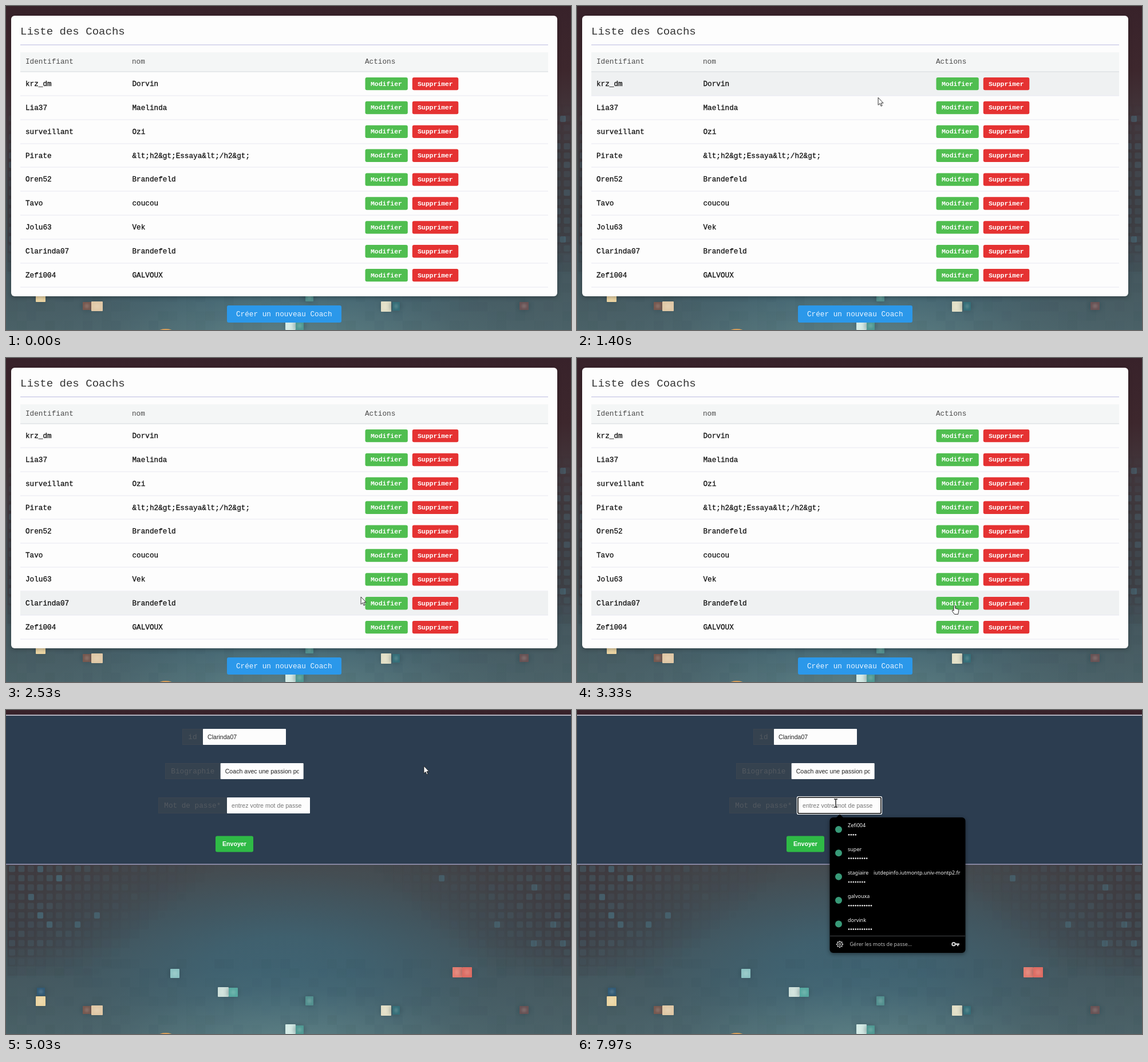
An HTML page with a canvas for the animation above (8 s loop, 987 by 567 pixels).

```html
<!DOCTYPE html>
<html lang="fr">
<head>
<meta charset="utf-8">
<title>Liste des Coachs</title>
<style>
html, body { margin: 0; width: 100%; height: 100%; overflow: hidden; background: #3a2329; }
canvas { display: block; }
</style>
</head>
<body>
<canvas id="stage" width="987" height="567"></canvas>
<script>
const W = 987, H = 567, LOOP = 8000;
const PAGE_SWITCH = 4000, FOCUS = 7895;
const MONO = '"Liberation Mono", "Courier New", monospace';
const SANS = '"Liberation Sans", Arial, sans-serif';
const UI = '"Noto Sans", "Open Sans", sans-serif';
const ctx = document.getElementById('stage').getContext('2d');

const coaches = [
  ['krz_dm', 'Dorvin'], ['Lia37', 'Maelinda'], ['surveillant', 'Ozi'],
  ['Pirate', '&lt;h2&gt;Essaya&lt;/h2&gt;'], ['Oren52', 'Brandefeld'],
  ['Tavo', 'coucou'], ['Jolu63', 'Vek'], ['Clarinda07', 'Brandefeld'],
  ['Zefi004', 'GALVOUX']
];
const logins = [
  ['Zefi004', 4], ['super', 9], ['stagiaire', 8, 'iutdepinfo.iutmontp.univ-montp2.fr'],
  ['galvouxa', 11], ['dorvink', 11]
];
const ROW_TOP = 115, ROW_H = 41.87;

// Pointer path: time, x, y
const path = [
  [600, 440, -30], [1400, 526, 160], [2100, 602, 385], [2530, 620, 418],
  [3400, 660, 433], [4130, 660, 433], [5030, 730, 98], [6230, 400, 228],
  [6600, 400, 228], [7370, 452, 163]
];

function rect(c, x, y, w, h, fill, r = 0) {
  c.fillStyle = fill;
  c.beginPath();
  c.roundRect(x, y, w, h, r);
  c.fill();
}

function text(str, x, y, size, color, family = MONO, weight = 400) {
  ctx.font = `${weight} ${size}px ${family}`;
  ctx.fillStyle = color;
  ctx.fillText(str, x, y);
}

function hash(i, j) {
  const v = Math.sin(i * 127.1 + j * 311.7) * 43758.5453;
  return v - Math.floor(v);
}

// Soft elliptical light; rgb is "r,g,b"
function glow(c, x, y, rx, ry, rgb, alpha) {
  c.save();
  c.translate(x, y);
  c.scale(rx / ry, 1);
  const g = c.createRadialGradient(0, 0, 0, 0, 0, ry);
  [[0, 1], [0.25, 0.88], [0.5, 0.5], [0.75, 0.13], [1, 0]]
    .forEach(([s, a]) => g.addColorStop(s, `rgba(${rgb},${alpha * a})`));
  c.fillStyle = g;
  c.fillRect(-ry, -ry, ry * 2, ry * 2);
  c.restore();
}

function makeBackdrop() {
  const cv = document.createElement('canvas');
  cv.width = W;
  cv.height = H;
  const c = cv.getContext('2d');
  const g = c.createLinearGradient(0, 0, 0, H);
  [[0, '#38222a'], [0.2, '#3d272d'], [0.36, '#43383d'], [0.5, '#454a4e'],
   [0.65, '#434e54'], [0.8, '#44565d'], [1, '#4b6268']].forEach(s => g.addColorStop(...s));
  c.fillStyle = g;
  c.fillRect(0, 0, W, H);
  glow(c, 485, 455, 500, 230, '62,102,119', 0.8);
  glow(c, 490, 600, 420, 150, '112,152,152', 0.5);

  // small tiles fading in from both edges
  for (let j = 0; j < 18; j++) {
    for (let i = 0; i < 60; i++) {
      const x = 5 + i * 16.43, y = 175 + j * 16.25;
      const reach = 360 - Math.max(0, j - 6) * 18;
      const k = 1 - Math.min(x, W - x) / reach;
      if (k <= 0) continue;
      const fade = Math.min(1, (18 - j) / 4, (j + 1) / 6);
      const a = k * fade, n = hash(i, j);
      rect(c, x - 2.5, y - 2.5, 16.43, 16.25, `rgba(56,42,47,${a * 0.5})`);
      rect(c, x, y, 11, 11, `rgba(72,98,110,${a * (0.25 + 0.35 * n * n)})`, 2);
    }
  }
  [[76, 375], [125, 375], [159, 359], [60, 359], [93, 294], [60, 278], [44, 327],
   [858, 375], [956, 375], [923, 310], [922, 408], [973, 408], [761, 294], [973, 197]]
    .forEach(([x, y]) => rect(c, x - 5, y - 5, 10, 11, 'rgba(80,128,146,.38)', 2));

  // faint blocks lower down
  for (let j = 0; j < 8; j++) {
    for (let i = 0; i < 60; i++) {
      const n = hash(i + 90, j + 40);
      if (n > 0.55) rect(c, i * 16.43 + 3, 436 + j * 16.4, 16.4, 16.4, `rgba(36,58,66,${(n - 0.5) * 0.12})`);
    }
  }

  [[54, 486, 14, 14, '#315a76'], [52, 501, 17, 17, '#ecd5a2'],
   [134, 518, 15, 14, '#77584f'], [149, 517, 20, 17, '#e0c8a6'],
   [287, 453, 16, 16, '#8cc3c3'], [370, 485, 19, 17, '#cfe1db'],
   [389, 486, 16, 16, '#57a8a0'], [523, 501, 14, 16, '#528f8e'],
   [655, 517, 18, 18, '#e2dfc6'], [675, 518, 13, 15, '#356e78'],
   [780, 450, 17, 18, '#e27c70'], [797, 450, 17, 18, '#dd6c63'],
   [897, 518, 16, 14, '#685254'], [488, 550, 18, 17, '#d4ebe6'],
   [506, 552, 14, 15, '#4f9892']].forEach(([x, y, w, h, col]) => {
    glow(c, x + w / 2, y + h / 2, 19, 17, '40,66,76', 0.4);
    rect(c, x, y, w, h, col, 1);
    glow(c, x + w / 2, y + h / 2, w / 2, h / 2, '255,255,245', 0.14);
  });
  c.fillStyle = '#dba05a';
  c.beginPath();
  c.ellipse(279, 570, 13, 5, 0, 0, 7);
  c.fill();
  return cv;
}
const backdrop = makeBackdrop();

// Monotone cubic through the path points
function slope(i, axis) {
  const a = path[i - 1], b = path[i], d = path[i + 1];
  if (!a || !d || (b[axis] - a[axis]) * (d[axis] - b[axis]) <= 0) return 0;
  return (d[axis] - a[axis]) / (d[0] - a[0]);
}
function pointer(t) {
  const last = path.length - 1;
  if (t <= path[0][0]) return path[0].slice(1);
  if (t >= path[last][0]) return path[last].slice(1);
  const i = path.findIndex(p => p[0] > t) - 1;
  const p = path[i], q = path[i + 1], span = q[0] - p[0], u = (t - p[0]) / span;
  const s = u * u * (3 - 2 * u);
  return [1, 2].map(k => p[k] + (q[k] - p[k]) * s
    + span * (slope(i, k) * u * (1 - u) ** 2 - slope(i + 1, k) * u * u * (1 - u)));
}

const inside = ([px, py], x, y, w, h) => px >= x && px <= x + w && py >= y && py <= y + h;

const shapes = {
  arrow: new Path2D('M0 0V13L3 10.3L5 15L7 14.1L5 9.6H9Z'),
  hand: new Path2D('M-1.4 1Q0-1 1.3 1V5.2L6 6.6Q7.6 7 7.3 9.5L6.2 15.5H0L-4 10.3Q-4.4 8 -2.5 8.5L-1.4 9.5Z'),
  beam: new Path2D('M-3-7H-1Q0-7 0-6Q0-7 1-7H3M0-6V6M-3 7H-1Q0 7 0 6Q0 7 1 7H3')
};
function drawCursor([x, y], kind) {
  ctx.save();
  ctx.translate(x, y);
  ctx.lineJoin = 'round';
  ctx.strokeStyle = '#1c1c1c';
  ctx.lineWidth = kind === 'beam' ? 1.4 : 0.9;
  if (kind !== 'beam') {
    ctx.fillStyle = '#fff';
    ctx.fill(shapes[kind]);
  }
  ctx.stroke(shapes[kind]);
  ctx.restore();
}

function listPage(t) {
  ctx.shadowColor = 'rgba(0,0,0,.3)';
  ctx.shadowBlur = 7;
  ctx.shadowOffsetY = 2;
  rect(ctx, 9, 17, 954, 491, '#fdfdfd', 6);
  ctx.shadowColor = 'transparent';
  text('Liste des Coachs', 25, 50, 19.05, '#333');
  rect(ctx, 25, 67, 922, 2, '#dadaee');
  rect(ctx, 25, 81, 922, 34, '#f4f6f6');
  [['Identifiant', 34], ['nom', 220], ['Actions', 627]]
    .forEach(([s, x]) => text(s, x, 101, 12.7, '#4a4a4a'));

  const [, hoverY] = pointer(t - 40);
  const hover = Math.floor((hoverY - ROW_TOP) / ROW_H);
  coaches.forEach((coach, i) => {
    const top = ROW_TOP + i * ROW_H, mid = top + 21;
    if (i === hover) rect(ctx, 25, top, 922, ROW_H, '#eff1f2');
    rect(ctx, 25, Math.round(top + ROW_H) - 0.5, 922, 1, '#e8e8f2');
    ctx.strokeStyle = '#111';
    ctx.lineWidth = 0.3;
    coach.forEach((s, k) => {
      const x = k ? 220.5 : 34;
      text(s, x, mid + 4, 12.7, '#111');
      ctx.strokeText(s, x, mid + 4);
    });
    rect(ctx, 627.5, mid - 11, 74.3, 22.3, '#50be50', 3);
    rect(ctx, 709.8, mid - 11, 80.5, 22.3, '#e53232', 3);
    text('Modifier', 637, mid + 3.6, 11.43, '#fff', MONO, 700);
    text('Supprimer', 719, mid + 3.6, 11.43, '#fff', MONO, 700);
  });
  rect(ctx, 25, 114.5, 922, 1, '#d5dade');

  rect(ctx, 386, 524, 200, 30, '#2b98ea', 3);
  text('Créer un nouveau Coach', 402, 543, 12.7, '#eaf5ff');
}

function field(label, x, fx, y, value, color) {
  rect(ctx, x, y, fx - x, 28, '#35424f', 2);
  ctx.strokeStyle = '#3e4750';
  ctx.lineWidth = 0.8;
  ctx.strokeRect(x + 0.4, y + 0.4, fx - x, 27.2);
  text(label, x + 10.3, y + 18, 12.7, '#535960');
  rect(ctx, fx, y, 145, 28, '#fdfdfd', 1);
  ctx.save();
  ctx.beginPath();
  ctx.rect(fx + 8, y, 129, 28);
  ctx.clip();
  text(value, fx + 8, y + 17.6, 10.6, color, SANS);
  ctx.restore();
}

function formPage() {
  rect(ctx, 0, 8, W, 263, '#2c3d50');
  rect(ctx, 0, 8.3, W, 1.6, '#c3bfca');
  rect(ctx, 0, 269.2, W, 1.6, '#a59fbd');
  field('id', 308, 344, 33, 'Clarinda07', '#222');
  field('Biographie', 278, 374.7, 93, 'Coach avec une passion pour', '#222');
  field('Mot de passe*', 266, 386, 153, 'entrez votre mot de passe', '#777');
  rect(ctx, 366, 220.5, 66, 28, '#2fba46', 3);
  text('Envoyer', 378, 238, 10.6, '#fff', SANS, 700);
}

function focusRing() {
  [[384.7, 151.7, 147.6, 30.6, '#fff', 1.6], [386, 153, 145, 28, '#101010', 1.6]]
    .forEach(([x, y, w, h, color, line]) => {
      ctx.strokeStyle = color;
      ctx.lineWidth = line;
      ctx.beginPath();
      ctx.roundRect(x, y, w, h, 2);
      ctx.stroke();
    });
}

function dot(x, y, r, color) {
  ctx.fillStyle = color;
  ctx.beginPath();
  ctx.arc(x, y, r, 0, 7);
  ctx.fill();
}

function ring(x, y, r, line) {
  ctx.lineWidth = line;
  ctx.beginPath();
  ctx.arc(x, y, r, 0, 7);
  ctx.stroke();
}

function popup(alpha) {
  ctx.save();
  ctx.globalAlpha = alpha;
  ctx.shadowColor = 'rgba(0,0,0,.45)';
  ctx.shadowBlur = 7;
  ctx.shadowOffsetY = 2;
  rect(ctx, 441.5, 188, 237, 237, '#000', 6);
  ctx.shadowColor = 'transparent';
  ctx.fill(new Path2D('M452 189L459 182.5L466 189Z'));
  logins.forEach(([name, count, site], i) => {
    const y = 202 + i * 41.35;
    dot(457, y + 7, 6, '#389a78');
    text(name, 473, y + 3.2, 9, '#f4f4f4', UI);
    if (site) text(site, 518, y + 3.2, 9, '#f4f4f4', UI);
    for (let k = 0; k < count; k++) dot(475 + k * 3.9, y + 16.3, 1.35, '#e8e8e8');
  });
  rect(ctx, 442, 395, 236, 1, '#45484c');
  text('Gérer les mots de passe...', 476.5, 413.3, 9, '#bdbdbd', UI);

  ctx.strokeStyle = '#ccc';
  ring(459, 410, 4.4, 1.2);
  ring(459, 410, 1.7, 1.1);
  for (let k = 0; k < 8; k++) {
    const a = k * Math.PI / 4;
    dot(459 + 5.4 * Math.cos(a), 410 + 5.4 * Math.sin(a), 0.9, '#ccc');
  }
  ring(658, 409.7, 2.7, 2.2);
  rect(ctx, 661, 408.4, 7, 2.6, '#ccc');
  rect(ctx, 664, 410, 2.4, 3.2, '#ccc');
  ctx.restore();
}

function cursorKind(t, p) {
  if (t < PAGE_SWITCH) {
    const y = (p[1] - ROW_TOP) % ROW_H;
    const overRow = p[1] > ROW_TOP && y > 10 && y < 32;
    return overRow && p[0] > 627.5 && p[0] < 702 ? 'hand' : 'arrow';
  }
  if (t < 4150 || inside(p, 366, 220.5, 66, 28)) return 'hand';
  const overField = inside(p, 344, 33, 145, 28) || inside(p, 375, 93, 145, 28)
    || inside(p, 386, 153, 145, 28);
  return overField ? 'beam' : 'arrow';
}

function draw(t) {
  ctx.drawImage(backdrop, 0, 0);
  if (t < PAGE_SWITCH) listPage(t);
  else formPage();
  if (t >= FOCUS) {
    focusRing();
    popup(Math.min(1, 0.35 + (t - FOCUS) / 100));
  }
  const p = pointer(t);
  drawCursor(p, cursorKind(t, p));
}

const start = performance.now();
function tick() {
  draw((performance.now() - start) % LOOP);
  requestAnimationFrame(tick);
}
tick();
</script>
</body>
</html>
```
